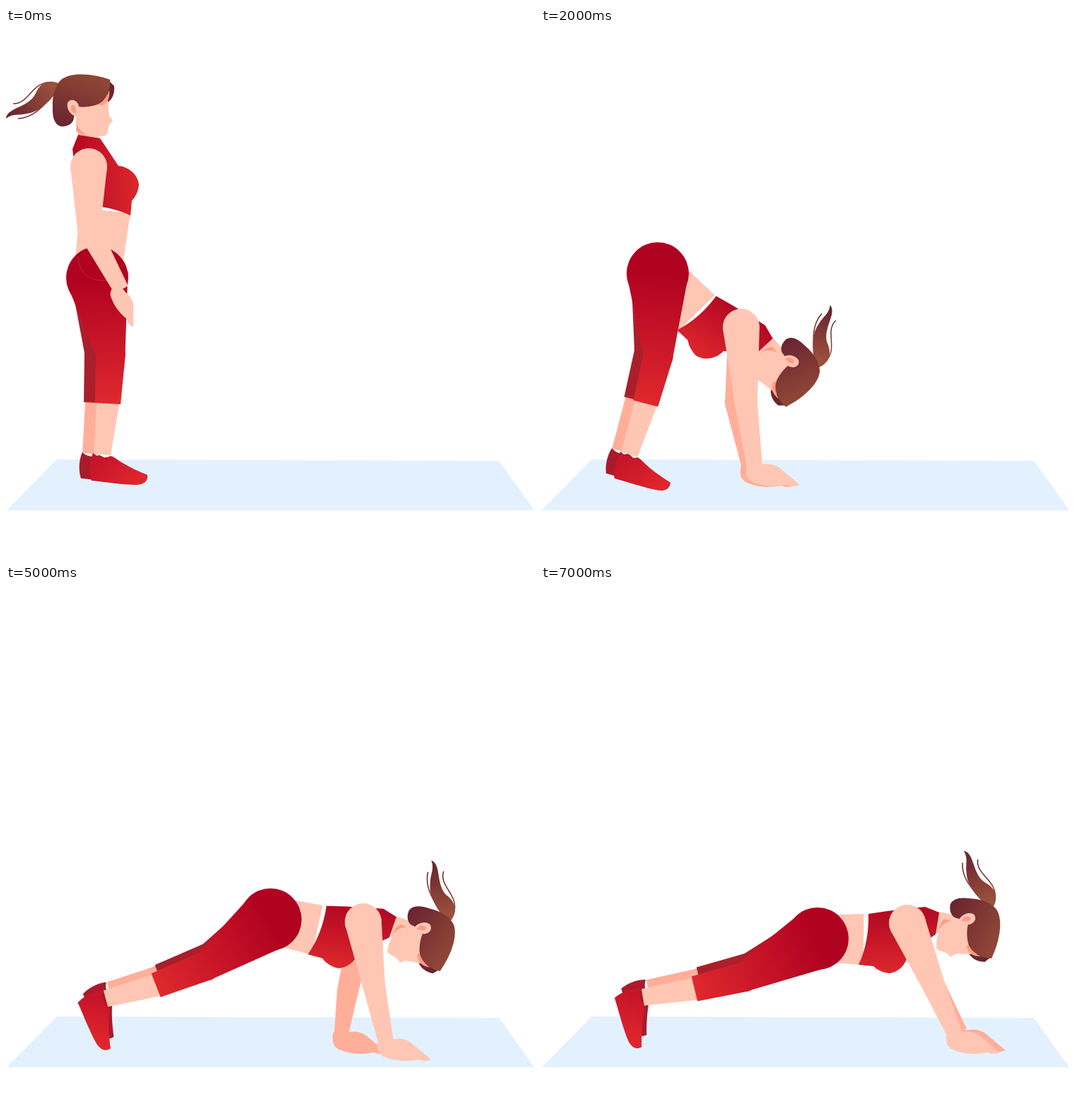
An HTML page with a canvas for the animation above (8000 ms loop, 748 by 748 pixels).

```html
<!DOCTYPE html>
<html lang="en">
<head>
<meta charset="utf-8">
<title>Walkout to plank</title>
<style>
  html, body { margin: 0; height: 100%; overflow: hidden; background: #fff; }
  canvas { display: block; }
</style>
</head>
<body>
<canvas id="stage" width="748" height="748"></canvas>
<script>
const ctx = document.getElementById('stage').getContext('2d');
const SKIN = '#ffc6b3', FAR_SKIN = '#ffae9a', SHADE = '#ff9c84';
const FAR_PANTS = '#aa1f2c', FAR_SHOE = '#a91b2b', HAIR = '#6a2530';

// Rigid parts, each around its own joint.
const SHOE = 'M-13-2C-19 12-18 27-15 37C5 39 30 43 49 43C60 42 65 37 64 29C54 25 38 18 24 9C16 3 12 1 10 3Q-2 7-13-2Z';
const HAND = 'M-11-3L12-3Q24-5 34 1L64 26Q55 30 46 26Q20 31 0 23Q-16 18-11-3Z';
const NECK = 'M98-10L107-39L150-30L128-5Z';
const BRA = 'M7-36L34-40L87-46L107-38L102-7L63 19C62 34 50 47 36 48Q22 46 14 38L-7 36Q8 4 7-36Z';

// Leg joints from hip to ankle, the turn of the foot, and the shift of the far leg.
const leg = (hip, knee, cuff, ankle, foot, far) => ({ hip, knee, cuff, ankle, foot, far });
const upright = leg([129, 353], [148, 460], [144, 531], [136, 603], 0, [-16, -1]);
const folded = { ...upright, hip: [131, 347] };
const leaning = leg([165, 347], [166, 463], [148, 531], [125, 603], 10, [-13, -5]);
const lunging = leg([267, 377], [231, 487], [190, 547], [148, 604], 29, [-9, -13]);
const piked = leg([347, 417], [273, 505], [212, 547], [148, 584], 48, [1, -11]);
const low = leg([374, 473], [284, 538], [212, 566], [141, 585], 60, [5, -12]);
const plank = leg([391, 500], [288, 554], [217, 571], [144, 583], 67, [7, -13]);

// Ribs position and turn; arms are elbow, wrist and the turn of the hand.
const pose = (legs, ribs, turn, near, far, more) => ({ legs, ribs, turn, near, far, ...more });
const arm = (elbow, wrist, hand = 0) => ({ elbow, wrist, hand });
const hang = arm([117, 285], [163, 370], 50);
const reach = arm([556, 568], [585, 635]);

const poses = [
  pose(upright, [140, 258], -90, hang, hang, { standing: true }),
  pose(folded, [190, 401], 38, arm([260, 528], [272, 617]), arm([245, 528], [264, 619])),
  pose(leaning, [220, 403], 38, arm([290, 530], [302, 620]), arm([275, 530], [294, 621])),
  pose(lunging, [318, 422], 38, arm([391, 550], [408, 632]), arm([356, 540], [346, 621])),
  pose(piked, [400, 454], 28, arm([425, 570], [407, 638]), arm([477, 550], [497, 630], -20)),
  pose(low, [440, 488], 10, arm([520, 565], [537, 645]), arm([483, 575], [474, 635])),
  pose(plank, [456, 501], 0, arm([525, 565], [537, 645]), reach),
  pose(plank, [456, 501], 0, reach, arm([556, 566], [593, 632]))
];

const rad = degrees => degrees * Math.PI / 180;
const fill = (d, color) => { ctx.fillStyle = color; ctx.fill(new Path2D(d)); };
const line = (d, color, width) => {
  ctx.strokeStyle = color;
  ctx.lineWidth = width;
  ctx.stroke(new Path2D(d));
};

function at([x, y], turn, draw, size = 1) {
  ctx.save();
  ctx.translate(x, y);
  ctx.rotate(rad(turn));
  ctx.scale(size, size);
  draw();
  ctx.restore();
}

function grad([x0, y0], [x1, y1], from, to) {
  const g = ctx.createLinearGradient(x0, y0, x1, y1);
  g.addColorStop(0, from);
  g.addColorStop(1, to);
  return g;
}

// Tapered limb: round at every joint, cut straight at the last one.
function limb(joints, radii, color) {
  ctx.fillStyle = color;
  for (let i = 0; i < joints.length - 1; i++) {
    const [x0, y0] = joints[i], [x1, y1] = joints[i + 1];
    const r0 = radii[i], r1 = radii[i + 1];
    const length = Math.hypot(x1 - x0, y1 - y0);
    const nx = (y0 - y1) / length, ny = (x1 - x0) / length;
    ctx.beginPath();
    ctx.arc(x0, y0, r0, 0, 2 * Math.PI);
    ctx.fill();
    ctx.beginPath();
    ctx.moveTo(x0 + nx * r0, y0 + ny * r0);
    ctx.lineTo(x1 + nx * r1, y1 + ny * r1);
    ctx.lineTo(x1 - nx * r1, y1 - ny * r1);
    ctx.lineTo(x0 - nx * r0, y0 - ny * r0);
    ctx.fill();
  }
}

function drawLeg({ hip, knee, cuff, ankle, foot, far }, isFar) {
  const shift = ([x, y]) => isFar ? [x + far[0], y + far[1]] : [x, y];
  const [k, c, a] = [knee, cuff, ankle].map(shift);
  limb([c, a], [16, 12], isFar ? FAR_SKIN : SKIN);
  const shoe = isFar ? FAR_SHOE : grad([0, 0], [50, 40], '#c61429', '#e0262c');
  at(a, foot, () => fill(SHOE, shoe), isFar ? 0.94 : 1);
  const cloth = isFar ? FAR_PANTS : grad(hip, cuff, '#b00221', '#df282d');
  limb([hip, k, c], [isFar ? 38 : 44, 21, 18], cloth);
}

function drawArm(shoulder, { elbow, wrist, hand }, radii, color) {
  limb([shoulder, elbow, wrist], radii, color);
  at(wrist, hand, () => fill(HAND, color), hand > 0 ? 0.8 : 1);
}

// Head around the ear, facing right.
function drawHead() {
  const tail = grad([-25, -28], [-88, 9], '#9a513c', HAIR);
  fill('M-19-35C-33-41-45-35-51-21C-57-7-73-3-85 4Q-93 9-93 15C-83 7-73 11-63 8C-47 6-33-7-23-21Z', tail);
  line('M-83-6C-60-5-57-38-29-36M-76 15Q-55 14-37-7', tail, 1.6);
  fill('M50-41L60-31C61-18 56-10 46-4Z', HAIR);
  fill('M5-9L50-23L53 11L58 18L53 24C51 30 51 38 48 39Q37 41 29 39L6 25Z', SKIN);
  fill('M7 23Q14 38 26 39Q10 38 6 32Z', SHADE);
  fill('M35-6Q50-12 53-25Q55-9 42-3Z', SHADE);
  fill('M-27-1C-28-18-23-33-15-40C-1-51 29-49 54-40C55-25 49-9 34-4Q20 0 8-2L3 13C3 23-7 27-16 26Q-28 22-27-1Z',
    grad([-11, 25], [19, -48], HAIR, '#8f4636'));
  fill('M-6-7C-2-14 7-12 10-3L7 12C-1 11-8 2-6-7Z', SKIN);
  fill('M-1-3Q6-9 6 8Q-3 6-1-3Z', SHADE);
}

function drawPose({ legs, ribs, turn, near, far, standing }) {
  const cos = Math.cos(rad(turn)), sin = Math.sin(rad(turn));
  const shoulder = [ribs[0] + 62 * cos + 23 * sin, ribs[1] + 62 * sin - 23 * cos];
  drawArm(shoulder, far, [18, 15, 10], FAR_SKIN);
  drawLeg(legs, true);
  limb([legs.hip, ribs], [33, 36], SKIN);
  drawLeg(legs, false);
  if (standing) line('M102 324Q104 360 146 357', '#d4475380', 1);
  at(ribs, turn, () => {
    fill(NECK, SKIN);
    at(standing ? [145, -47] : [147, -31], standing ? 90 : 96, drawHead);
    fill(BRA, grad([25, -35], [30, 45], '#b50a24', '#dc262c'));
  });
  drawArm(shoulder, near, [26, 16, 11], SKIN);
}

function frame(now) {
  ctx.fillStyle = '#fff';
  ctx.fillRect(0, 0, 748, 748);
  fill('M72 610L697 612L747 682H1Z', '#e3f1ff');
  drawPose(poses[Math.floor(now / 1000) % poses.length]);
  requestAnimationFrame(frame);
}
frame(0);
</script>
</body>
</html>
```
